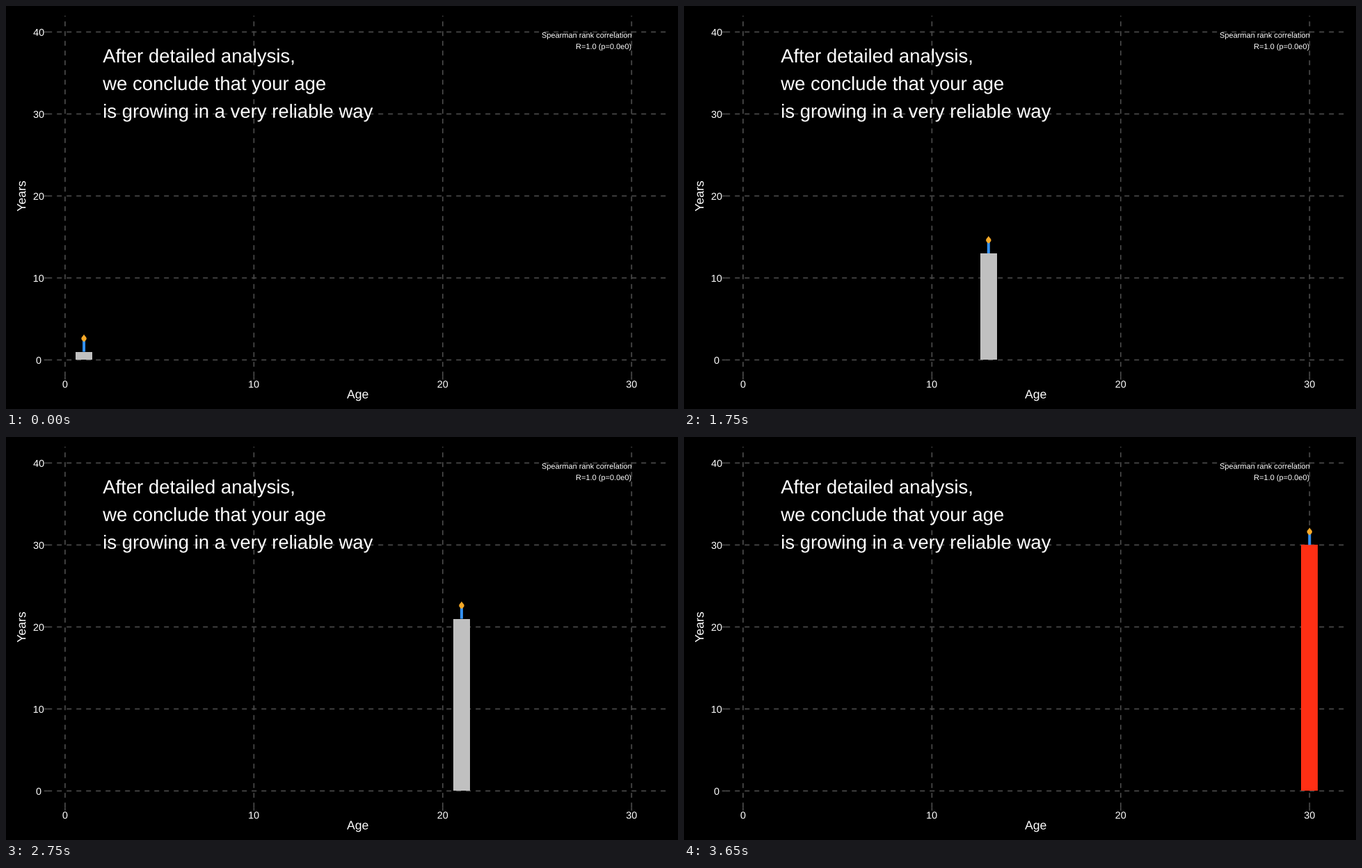
Recreate the animation shown at these times as a matplotlib script. Size 966 by 580 pixels, loop 5000 ms.

```python
import matplotlib.pyplot as plt
from matplotlib.animation import FuncAnimation
from matplotlib.patches import PathPatch, Rectangle
from matplotlib.path import Path
from matplotlib.textpath import TextPath
from matplotlib.transforms import Affine2D

W, H, DPI = 966, 580, 100
STEP = 50            # ms per frame
LOOP = 5000
X0, Y0 = 84.9, 509.4
DX, DY = 27.145, 11.8
LEFT, RIGHT, TOP, BOTTOM = 59.2, 952, 14, 533.2
TICK = 4.5
LAST = 30

GRID = "#484848"
GREY, RED = "#c0c0c0", "#ff2f14"
BLUE, ORANGE = "#3391f5", "#f6a928"

plt.rcParams["font.family"] = "Liberation Sans"
plt.rcParams["toolbar"] = "None"

fig = plt.figure(figsize=(W / DPI, H / DPI), dpi=DPI, facecolor="black")
ax = fig.add_axes([0, 0, 1, 1])
ax.set_xlim(0, W)
ax.set_ylim(H, 0)
ax.axis("off")


def px_x(age):
    return X0 + DX * age


def px_y(years):
    return Y0 - DY * years


def rule(xs, ys, style="-"):
    ax.plot(xs, ys, color=GRID, lw=1.75 * 72 / DPI, ls=style, snap=False,
            solid_capstyle="butt", dash_capstyle="butt", zorder=1)


def label(x, y, text, size, align=0.5, turn=0):
    """Text as outlines: baseline at y, align 0 = left, 1 = right."""
    path = TextPath((0, 0), text, size=size)
    box = path.get_extents()
    shift = -align * (box.x0 + box.x1)
    place = Affine2D().translate(shift, 0).scale(1, -1)
    place.rotate_deg(-turn).translate(x, y)
    ax.add_patch(PathPatch(place.transform_path(path), fc="white", lw=0,
                           snap=False, zorder=5))


dashes = (0, (4, 4))
for v in range(0, 41, 10):
    y = px_y(v)
    rule([LEFT, RIGHT], [y, y], dashes)
    rule([LEFT - TICK, LEFT], [y, y])
    label(47, y + 5.5, str(v), 14.4)
for v in range(0, 31, 10):
    x = px_x(v)
    rule([x, x], [BOTTOM, TOP], dashes)
    rule([x, x], [BOTTOM, BOTTOM + TICK])
    label(x, 549.3, str(v), 14.4)

label(505.3, 564.7, "Age", 17.6)
label(28.2, 273.7, "Years", 17.6, turn=90)

message = ("After detailed analysis,", "we conclude that your age",
           "is growing in a very reliable way")
for i, line in enumerate(message):
    label(139.2, 81.2 + 39.8 * i, line, 27.5, align=0)
label(899.4, 45.7, "Spearman rank correlation", 11, align=1)
label(899.4, 62, "R=1.0 (p=0.0e0)", 11, align=1)

bar = ax.add_patch(Rectangle((0, 0), 24.4, 1, lw=0, zorder=2, snap=True))
candle = ax.add_patch(Rectangle((0, 0), 4, 17, lw=0, fc=BLUE, zorder=3,
                                snap=False))
flame = ax.add_patch(PathPatch(Path([(0, 0)]), lw=0, fc=ORANGE, zorder=4))


def flame_path(x, y):
    pts = [(0, -6), (1.2, -3.6), (3.7, -2.2), (3.7, 0),
           (3.7, 2), (1.6, 3.6), (0, 4.8),
           (-1.6, 3.6), (-3.7, 2), (-3.7, 0),
           (-3.7, -2.2), (-1.2, -3.6), (0, -6)]
    return Path([(x + a, y + b) for a, b in pts],
                [Path.MOVETO] + [Path.CURVE4] * 12)


def age_at(t):
    if t < 100:
        return 1
    if t < 2350:
        return 2 + (t - 100) // 150
    return min(LAST, 17 + (t - 2350) // 100)


def draw(frame):
    age = age_at(frame * STEP)
    x, y = px_x(age), px_y(age)
    bar.set_xy((x - 12.2, y))
    bar.set_height(Y0 - y)
    bar.set_facecolor(RED if age == LAST else GREY)
    candle.set_xy((x - 2, y - 17))
    flame.set_path(flame_path(x, y - 19))
    return bar, candle, flame


anim = FuncAnimation(fig, draw, frames=LOOP // STEP, interval=STEP,
                     repeat=True, repeat_delay=0, blit=False)
plt.show()
```
